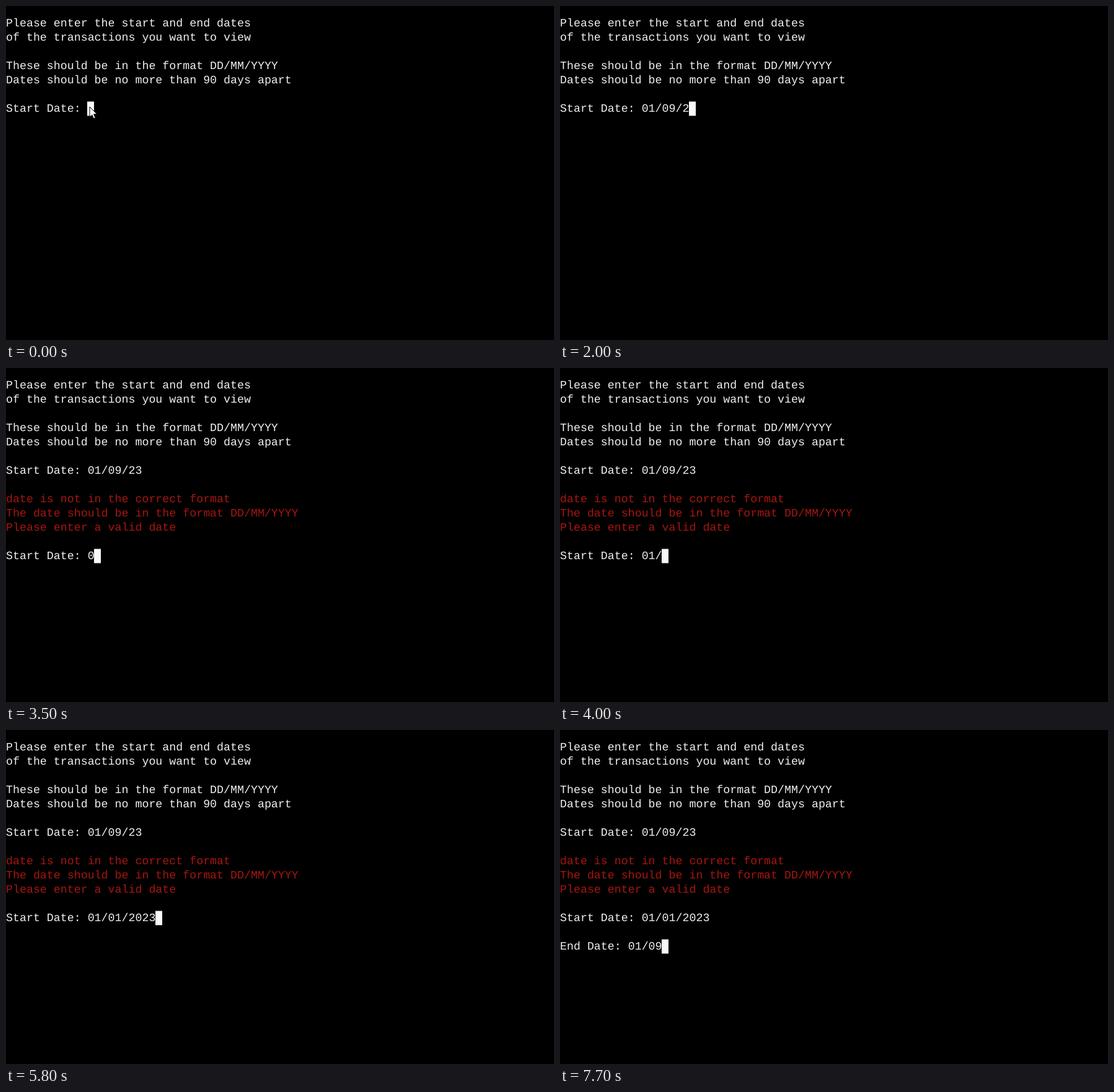
An HTML page that plays this animation: 884x540 px, repeating every 8 s.

```html
<!DOCTYPE html>
<html lang="en">
<head>
<meta charset="utf-8">
<title>Date entry terminal</title>
<style>
  html, body { margin: 0; width: 100%; height: 100%; overflow: hidden; background: #000; }
  svg { display: block; }
  text {
    font: 18.3px "Liberation Mono", "Courier New", monospace;
    fill: #f0f0f0;
    white-space: pre;
    text-rendering: geometricPrecision;
  }
  .error { fill: #a81610; }
</style>
</head>
<body>
<svg id="stage" width="884" height="540" viewBox="0 0 884 540">
  <rect id="caret" width="11" height="23" fill="#faf9fa"/>
  <path id="pointer" d="M135 163v16.5l3.8-3.6 2.6 6.1 2.7-1.1-2.6-6h5.2z"
        fill="#fff" stroke="#000" stroke-width="1"/>
</svg>
<script>
const LOOP = 8000, TOP = 16.5, ROW = 23, COL = 10.98, BASELINE = 16.5;

const intro = [
  "Please enter the start and end dates",
  "of the transactions you want to view",
  "",
  "These should be in the format DD/MM/YYYY",
  "Dates should be no more than 90 days apart"
];
const errors = [
  "date is not in the correct format",
  "The date should be in the format DD/MM/YYYY",
  "Please enter a valid date"
];

// keys: the time at which each character of the answer is typed
const prompts = [
  { row: 6, at: 0, label: "Start Date: ", answer: "01/09/23",
    keys: [100, 200, 700, 1000, 1100, 1400, 2000, 2100] },
  { row: 12, at: 2400, label: "Start Date: ", answer: "01/01/2023",
    keys: [3500, 3600, 4000, 4400, 4500, 4900, 5500, 5600, 5700, 5800] },
  { row: 14, at: 6200, label: "End Date: ", answer: "01/09",
    keys: [6800, 6900, 7400, 7700, 7700] }
];

const stage = document.getElementById("stage");
const caret = document.getElementById("caret");
const pointer = document.getElementById("pointer");

function addLine(row, content = "", className = "") {
  const line = document.createElementNS("http://www.w3.org/2000/svg", "text");
  line.setAttribute("y", TOP + row * ROW + BASELINE);
  line.setAttribute("class", className);
  line.textContent = content;
  return stage.insertBefore(line, pointer);
}

const show = (el, on) => el.setAttribute("visibility", on ? "visible" : "hidden");

intro.forEach((s, i) => addLine(i, s));
const errorLines = errors.map((s, i) => addLine(8 + i, s, "error"));
for (const p of prompts) p.line = addLine(p.row);

function render(t) {
  for (const p of prompts) {
    const typed = p.keys.filter(k => k <= t).length;
    const content = t < p.at ? "" : p.label + p.answer.slice(0, typed);
    if (p.line.textContent !== content) p.line.textContent = content;
    if (t >= p.at) {
      caret.setAttribute("x", Math.floor(content.length * COL));
      caret.setAttribute("y", TOP + p.row * ROW);
    }
  }
  errorLines.forEach(line => show(line, t >= prompts[1].at));
  show(pointer, t < 100);
}

const start = performance.now();
function tick() {
  render((performance.now() - start) % LOOP);
  requestAnimationFrame(tick);
}
tick();
</script>
</body>
</html>
```
